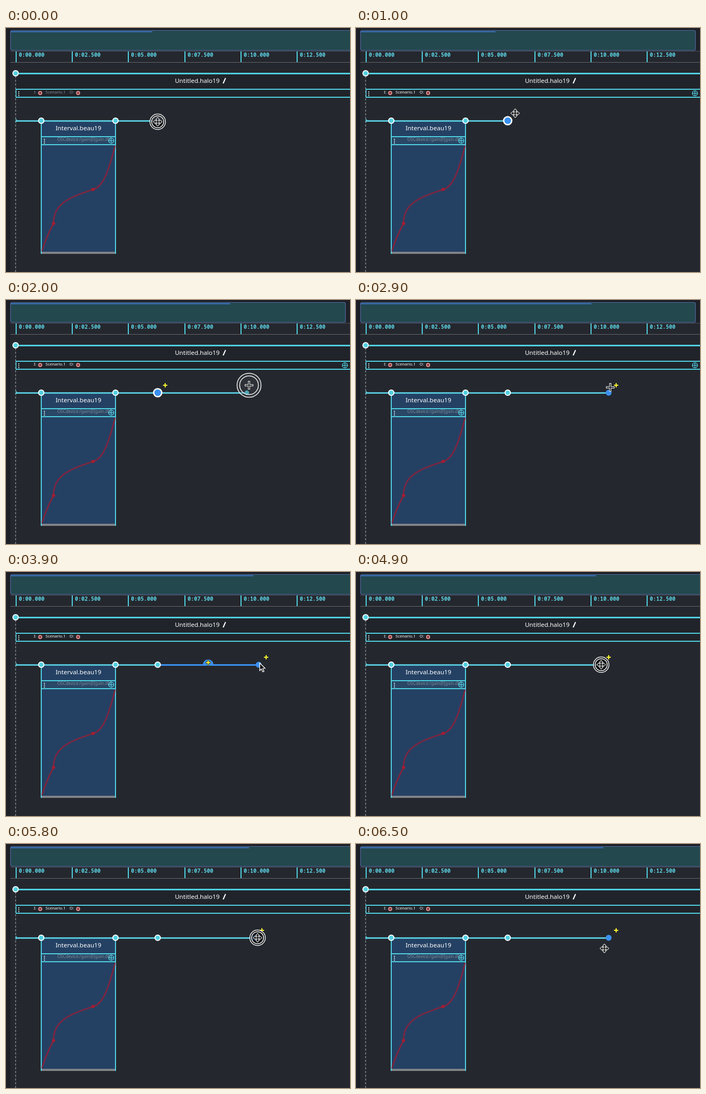
Animation, 644 px wide and 458 px high, one loop 6600 ms. Source, as an HTML page with a canvas:

```html
<!DOCTYPE html>
<html lang="en">
<head>
<meta charset="utf-8">
<title>Timeline editor</title>
<style>
html, body { margin: 0; width: 100%; height: 100%; overflow: hidden; background: #24282e; }
canvas { display: block; }
</style>
</head>
<body>
<canvas id="stage" width="644" height="458"></canvas>
<script>
const c = document.getElementById('stage').getContext('2d');
const LOOP = 6600, STEP = 100, LEFT = 18, JOINT = 284;
const CYAN = '#50cfe0', LINE = '#56c3d6', BLUE = '#3b90f0', BG = '#24282e', YELLOW = '#fbf432';
const SANS = '"Noto Sans", "Open Sans", sans-serif';
const MONO = '"Noto Sans Mono", "DejaVu Sans Mono", monospace';
const TITLE = '500 11.6px ' + SANS, SMALL = '500 7.7px ' + SANS;

const within = (t, a, b) => t >= a && t < b;
const progress = (t, a, b) => Math.min(1, Math.max(0, (t - a) / (b - a)));
const ease = (t, a, b) => { const u = progress(t, a, b); return u * u * (3 - 2 * u); };
const easeOut = (t, a, b) => 1 - (1 - progress(t, a, b)) ** 2;
const bump = (t, a, b) => Math.sin(Math.PI * progress(t, a, b)) ** 2;

// The end is pulled out to the right, then dragged back and forth.
function endAt(t) {
  return [
    Math.round(JOINT + 189 * easeOut(t, 1400, 2310) - 31.5 * bump(t, 4550, 6050)),
    Math.round(174 + 2 * ease(t, 4900, 6100))
  ];
}

// The pointer follows the end; each term is one move away from it.
function pointerAt(t, endX, y) {
  const toPlus = ease(t, 600, 1000), toEnd = ease(t, 2700, 3200);
  const grab = ease(t, 3950, 4200), leave = ease(t, 6200, 6500);
  return [
    Math.round(endX + 14 * toPlus - 10 * ease(t, 1400, 2000) - 2 * toEnd - 2 * grab
      + 6 * ease(t, 4900, 5400) - 14 * leave),
    Math.round(y + 2 - 16 * toPlus + 11 * toEnd + 3 * grab + 20 * leave)
  ];
}

function rect(x, y, w, h, color) {
  c.fillStyle = color;
  c.fillRect(x, y, w, h);
}

function paint(fill, stroke, width = 1) {
  if (fill) { c.fillStyle = fill; c.fill(); }
  if (stroke) { c.strokeStyle = stroke; c.lineWidth = width; c.stroke(); }
}

function line(color, width, x1, y1, x2, y2) {
  c.beginPath();
  c.moveTo(x1, y1);
  c.lineTo(x2, y2);
  paint(null, color, width);
}

function shape(points, ...style) {
  c.beginPath();
  points.forEach(p => c.lineTo(...p));
  c.closePath();
  paint(...style);
}

function disc(x, y, r, ...style) {
  c.beginPath();
  c.arc(x, y, r, 0, Math.PI * 2);
  paint(...style);
}

function text(str, x, y, font, color, align = 'left') {
  c.font = font;
  c.textAlign = align;
  c.fillStyle = color;
  c.fillText(str, x, y);
}

function plus(x, y, r, color, width) {
  line(color, width, x - r, y, x + r, y);
  line(color, width, x, y - r, x, y + r);
}

function yellowPlus(x, y) {
  plus(x, y, 4.8, BG, 3.6);
  plus(x, y, 4, YELLOW, 2);
}

const node = (x, y) => disc(x, y, 5, CYAN, '#fff', 2);
const port = x => disc(x, 122, 3, '#8d3b40', '#f0a0a0', 1.4);

function addButton(x, y) {
  disc(x, y, 4.8, null, CYAN, 1.3);
  plus(x, y, 4.5, CYAN, 1.2);
}

function handle(x, y) {
  for (let i = 0; i < 3; i++) rect(x - 1, y + i * 3.5, 1.8, 1.8, '#d5f4f8');
}

function backdrop(zoomedOut, endX, dim) {
  rect(0, 0, 644, 458, BG);
  rect(0, 0, 644, 44, '#1e2128');
  rect(0, 0, 8, 458, '#1c1f25');
  c.beginPath();
  c.roundRect(8.5, 4.5, zoomedOut ? 627 : 650, 37.5, 3);
  paint('#23484e', '#55659c', 1.2);
  rect(9, 6, (zoomedOut ? 0.951 : 1) * (endX - LEFT) - 1, 2, '#3b70bd');

  rect(8, 44, 636, 21, BG);
  rect(8, 43, 636, 1, '#4d535b');
  rect(8, 64, 636, 1, '#62666b');
  for (let i = 0; i < 6; i++) {
    const x = Math.round(LEFT + i * 105.2);
    rect(x, 44, 2, 20, CYAN);
    text('0:' + (i * 2.5).toFixed(3).padStart(6, '0'), x + 6, 54, 'bold 10px ' + MONO, '#5ccfe0');
  }

  rect(LEFT, 86, 626, 44, '#20242a');
  c.setLineDash([4, 3]);
  line('#9b9da0', 1.2, LEFT, 90, LEFT, 458);
  c.setLineDash([]);
  rect(LEFT, 84, 626, 3, CYAN);
  node(LEFT, 85);
  text('Untitled.halo19', 358, 103, TITLE, '#fff', 'center');
  line('#fff', 2, 406.5, 104, 411, 94);

  rect(LEFT, 114, 626, 2, CYAN);
  rect(LEFT, 129, 626, 2, CYAN);
  rect(LEFT, 114, 1.5, 17, CYAN);
  handle(24, 119);
  const ink = dim ? '#858a8f' : '#fff';
  text('I:', 52, 123, SMALL, ink);
  text('Scenario.1', 74, 123, SMALL, ink);
  text('O:', 119, 123, SMALL, ink);
  port(64);
  port(135);
  if (zoomedOut) addButton(634.5, 122.5);
}

function curve(y) {
  c.beginPath();
  c.moveTo(67, y + 245);
  c.quadraticCurveTo(76, y + 217, 89, y + 193);
  c.bezierCurveTo(88, y + 151, 130, y + 141, 163, y + 129);
  c.bezierCurveTo(185, y + 124, 195, y + 81, 204.5, y + 47);
  paint(null, 'rgba(150,30,60,.25)', 4);
  paint(null, 'rgba(175,25,45,.75)', 1.7);
  disc(89, y + 193, 3, '#a81c30');
  disc(163, y + 129, 3, '#a81c30');
}

function intervalBox(y) {
  rect(66, y, 139, 250, '#244164');
  rect(66, y + 30, 139, 15, '#294766');
  rect(66, y + 246, 139, 4, '#808388');
  rect(66, y + 29, 139, 2, CYAN);
  rect(66, y + 44, 139, 2, CYAN);
  rect(65, y, 2, 250, CYAN);
  rect(204, y, 2, 250, CYAN);
  text('Interval.beau19', 135.5, y + 18, TITLE, '#fff', 'center');
  handle(72, y + 34);
  text('OSCdevice:/gain@[gain.db]', 96, y + 38, '8px ' + SANS, '#7f8b98');
  addButton(197, y + 37.5);
  curve(y);
}

function moveIcon() {
  const half = [[0, -7.5], [2.7, -4.2], [0.8, -4.2], [0.8, 0]];
  const arrow = [...half, ...half.slice(1).reverse().map(([x, y]) => [-x, y])];
  const cross = (color, width) => {
    for (let i = 0; i < 4; i++) {
      c.rotate(Math.PI / 2);
      shape(arrow, color, color, width);
    }
  };
  c.lineJoin = 'round';
  cross('#f4f4f4', 2.2);
  cross('#111', 0.2);
  c.lineJoin = 'miter';
}

function arrowIcon() {
  shape([[0, 0], [0, 14], [3.2, 11], [5.6, 16.5], [8, 15.4], [5.7, 10.2], [10, 9.8]], '#111', '#fff', 1.3);
}

function crossIcon() {
  plus(0, 0, 8, '#f4f4f4', 3.8);
  plus(0, 0, 7, '#24272b', 1.8);
}

function halo(r, fill) {
  disc(0, 0, r, fill, '#eee', 1.5);
  disc(0, 0, r * 0.78, null, '#eee', 1.5);
}

function pointer(t, endX, y) {
  const crossing = within(t, 1100, 3000);
  const pressed = t < 600 || within(t, 1400, 2700) || within(t, 4300, 6200);
  c.save();
  c.translate(...pointerAt(t, endX, y));
  if (pressed && crossing) halo(22.5, 'rgba(70,72,76,.3)');
  else if (pressed) halo(14.5, 'rgba(8,9,11,.8)');
  if (crossing) crossIcon();
  else if (within(t, 3000, 4100)) arrowIcon();
  else moveIcon();
  c.restore();
}

function draw(t) {
  const [endX, y] = endAt(t);
  const released = t >= 2700;
  backdrop(within(t, 500, 3300), endX, t < 500);

  intervalBox(y);
  rect(LEFT, y - 1, endX - LEFT, 3, LINE);
  shape([[LEFT, y - 4], [LEFT + 4, y], [LEFT, y + 4]], LINE);
  if (within(t, 3300, 4200)) {
    const mid = (JOINT + endX) / 2;
    rect(JOINT, y - 1, endX - JOINT, 3, BLUE);
    c.beginPath();
    c.arc(mid, y, 10, Math.PI, 0);
    paint(BLUE);
    yellowPlus(mid, y - 4);
  }
  node(66, y);
  node(205, y);
  if (released) node(JOINT, y);
  else disc(JOINT, y, 7.5, BLUE, '#fff', 2.6);
  if (t >= 1500) disc(endX, y, released ? 5.5 : 4.2, released ? BLUE : CYAN);

  if (t >= 1100) yellowPlus((released ? endX : JOINT) + 14, y - 14);
  pointer(t, endX, y);
}

function tick(now) {
  draw(Math.floor(now % LOOP / STEP) * STEP);
  requestAnimationFrame(tick);
}
requestAnimationFrame(tick);
</script>
</body>
</html>
```
